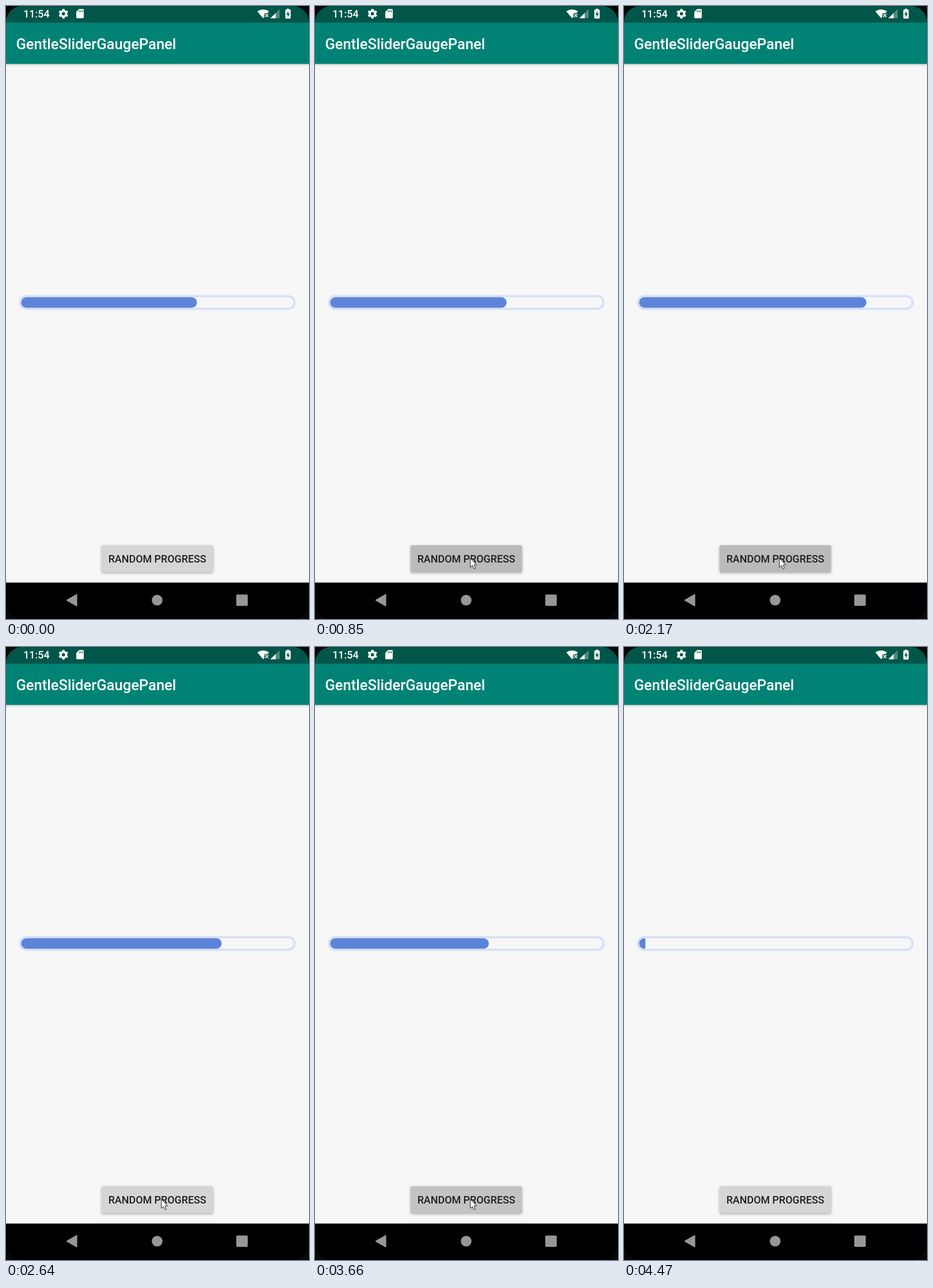
These frames come from a looping animation (526 by 1064 pixels, 5.75 s). An HTML page with a canvas:

```html
<!DOCTYPE html>
<html lang="en">
<head>
<meta charset="utf-8">
<title>Progress bar demo</title>
<style>
  html, body { margin: 0; width: 100%; height: 100%; overflow: hidden; background: #000; }
  canvas { display: block; width: 526px; height: 1064px; }
</style>
</head>
<body>
<canvas id="stage" width="526" height="1064"></canvas>
<script>
const W = 526, H = 1064, LOOP = 5750, BAR_TIME = 1000;
const ctx = document.getElementById('stage').getContext('2d');

const HOME = { x: 269.7, y: 958.7 };
const BUTTON = { x: 166, y: 936, w: 193.3, h: 46.7 };
const clicks = [
  { press: 710, release: 775, from: 331.5, to: 421 },
  { press: 2060, release: 2153, from: 421, to: 323.7 },
  { press: 3380, release: 3482, from: 323.7, to: 37 }
];

const clamp = v => Math.min(1, Math.max(0, v));
const span = (t, start, length) => clamp((t - start) / length);
const mix = (a, b, k) => a + (b - a) * k;
const easeInOut = k => (1 - Math.cos(Math.PI * k)) / 2;
const easeOut = k => 1 - (1 - k) ** 3;

function rect(x, y, w, h, color) {
  ctx.fillStyle = color;
  ctx.fillRect(x, y, w, h);
}

function roundRect(x, y, w, h, radius, color) {
  ctx.beginPath();
  ctx.roundRect(x, y, w, h, radius);
  ctx.fillStyle = color;
  ctx.fill();
}

function disc(x, y, r, color) {
  ctx.beginPath();
  ctx.arc(x, y, r, 0, Math.PI * 2);
  ctx.fillStyle = color;
  ctx.fill();
}

function polygon(points, color) {
  ctx.beginPath();
  points.forEach(([x, y]) => ctx.lineTo(x, y));
  ctx.closePath();
  ctx.fillStyle = color;
  ctx.fill();
}

function text(label, x, y, size, color, align = 'left') {
  ctx.font = `500 ${size}px Roboto, sans-serif`;
  ctx.textAlign = align;
  ctx.fillStyle = color;
  ctx.fillText(label, x, y);
}

function drawGear(x, y) {
  ctx.save();
  ctx.translate(x, y);
  for (let i = 0; i < 6; i++) {
    polygon([[-2.7, -5], [-1.8, -8.3], [1.8, -8.3], [2.7, -5]], '#fff');
    ctx.rotate(Math.PI / 3);
  }
  ctx.restore();
  disc(x, y, 6.2, '#fff');
  disc(x, y, 2.8, '#005648');
}

function drawSdCard() {
  ctx.beginPath();
  ctx.moveTo(127, 5.3);
  ctx.arcTo(135, 5.3, 135, 21.3, 1.5);
  ctx.arcTo(135, 21.3, 122, 21.3, 1.5);
  ctx.arcTo(122, 21.3, 122, 10, 1.5);
  ctx.lineTo(122, 10.3);
  ctx.closePath();
  ctx.fillStyle = '#fff';
  ctx.fill();
  for (const x of [126.6, 129.3, 132]) rect(x, 7.5, 1.3, 3.2, '#005648');
}

function drawWifi() {
  ctx.beginPath();
  ctx.moveTo(446.4, 21.3);
  ctx.lineTo(436.2, 9.2);
  ctx.quadraticCurveTo(446.4, 2.6, 456.6, 9.2);
  ctx.lineTo(453.8, 12.4);
  ctx.lineTo(448.5, 12.4);
  ctx.lineTo(448.5, 18.8);
  ctx.closePath();
  ctx.fillStyle = '#fff';
  ctx.fill();
  ctx.beginPath();
  ctx.moveTo(450, 13.8);
  ctx.lineTo(455.4, 19.2);
  ctx.moveTo(455.4, 13.8);
  ctx.lineTo(450, 19.2);
  ctx.strokeStyle = '#fff';
  ctx.lineWidth = 1.5;
  ctx.stroke();
}

function drawStatusBar() {
  rect(0, 0, W, 29, '#005648');
  text('11:54', 30.2, 20.3, 17.9, '#fff');
  drawGear(99.7, 13.4);
  drawSdCard();
  drawWifi();
  polygon([[459, 21.3], [475, 21.3], [475, 5.5]], 'rgba(255,255,255,.3)');
  polygon([[459, 21.3], [468.2, 21.3], [468.2, 12.2]], '#fff');
  rect(487.5, 4.7, 4, 3, '#fff');
  roundRect(484.9, 6.3, 9.3, 15.4, 1.2, '#fff');
  polygon([[490.2, 8.7], [486.7, 14.9], [489, 14.9], [489, 19.4], [492.6, 13], [490.2, 13]], '#005648');
}

function drawAppBar() {
  const shade = ctx.createLinearGradient(0, 100, 0, 106);
  shade.addColorStop(0, 'rgba(0,0,0,.22)');
  shade.addColorStop(0.4, 'rgba(0,0,0,.07)');
  shade.addColorStop(1, 'rgba(0,0,0,0)');
  rect(0, 100, W, 6, shade);
  rect(0, 29, W, 71.5, '#008375');
  text('GentleSliderGaugePanel', 17.4, 74.8, 25.57, '#fff');
}

function drawProgress(t) {
  let right = clicks[0].from;
  for (const { release, from, to } of clicks) {
    if (t >= release) right = mix(from, to, easeInOut(span(t, release, BAR_TIME)));
  }
  roundRect(22.4, 501.8, 480.4, 25.8, 12.9, '#d6dffa');
  roundRect(26.3, 505.6, 472.6, 18.1, 9, '#f7f7f7');

  const width = right - 26.3;
  const endRadius = Math.min(9, Math.max(0, width - 9));
  roundRect(26.3, 505.6, width, 18.1, [9, endRadius, endRadius, 9], '#5c84d8');
}

function drawRipple(t) {
  const click = clicks.findLast(c => t >= c.press);
  if (!click) return;
  const age = t - click.press;
  const alpha = span(age, 0, 75) * (1 - span(age, 235, 150));
  if (!alpha) return;
  ctx.save();
  ctx.beginPath();
  ctx.roundRect(BUTTON.x, BUTTON.y, BUTTON.w, BUTTON.h, 2.5);
  ctx.clip();
  disc(HOME.x, HOME.y, mix(30, 115, easeOut(span(age, 0, 200))), `rgba(0,0,0,${0.125 * alpha})`);
  ctx.restore();
}

function drawButton(t) {
  const { x, y, w, h } = BUTTON;
  ctx.save();
  ctx.shadowColor = 'rgba(0,0,0,.32)';
  ctx.shadowBlur = 4;
  ctx.shadowOffsetY = 1.6;
  roundRect(x, y, w, h, 2.5, '#d4d5d4');
  ctx.restore();
  drawRipple(t);
  text('RANDOM PROGRESS', x + w / 2, 966, 17.9, '#1d2221', 'center');
}

function drawNavBar() {
  const gray = '#979797';
  rect(0, 1000.7, W, H - 1000.7, '#000');
  ctx.lineJoin = 'round';
  ctx.lineWidth = 2;
  ctx.strokeStyle = gray;
  polygon([[106, 1031.3], [122.6, 1021.8], [122.6, 1040.8]], gray);
  ctx.stroke();
  disc(262.4, 1031.3, 9.3, gray);
  roundRect(399.7, 1021.4, 20, 19.8, 2, gray);
}

function drawScreenCorners() {
  const r = 28;
  ctx.beginPath();
  ctx.rect(0, 0, W, H);
  ctx.roundRect(0, 0, W, H, r);
  ctx.fillStyle = '#080808';
  ctx.fill('evenodd');
}

function cursorAt(t) {
  if (t < 260 || t >= 4470) return null;
  const arrive = easeOut(span(t, 260, 220));
  const leave = span(t, 4270, 200) ** 2;
  return {
    x: mix(mix(391, HOME.x, arrive), 418, leave),
    y: mix(mix(1058, HOME.y, arrive), 1064, leave)
  };
}

function drawCursor(t) {
  const pos = cursorAt(t);
  if (!pos) return;
  ctx.save();
  ctx.translate(pos.x, pos.y);
  polygon([[0, 0], [0, 15.6], [3.6, 12.4], [6.3, 18.3], [8.9, 17.1], [6.3, 11.5], [11, 11.2]], '#fff');
  ctx.lineJoin = 'miter';
  ctx.lineWidth = 1;
  ctx.strokeStyle = '#222';
  ctx.stroke();
  ctx.restore();
}

function draw(t) {
  rect(0, 0, W, H, '#f7f7f7');
  drawAppBar();
  drawStatusBar();
  drawProgress(t);
  drawButton(t);
  drawNavBar();
  drawScreenCorners();
  drawCursor(t);
  if (clicks.some(c => t >= c.press && t < c.release)) {
    disc(HOME.x, HOME.y, 15, 'rgba(235,235,20,.6)');
  }
}

let startTime;
function tick(now) {
  startTime ??= now;
  draw((now - startTime) % LOOP);
  requestAnimationFrame(tick);
}
draw(0);
requestAnimationFrame(tick);
</script>
</body>
</html>
```
